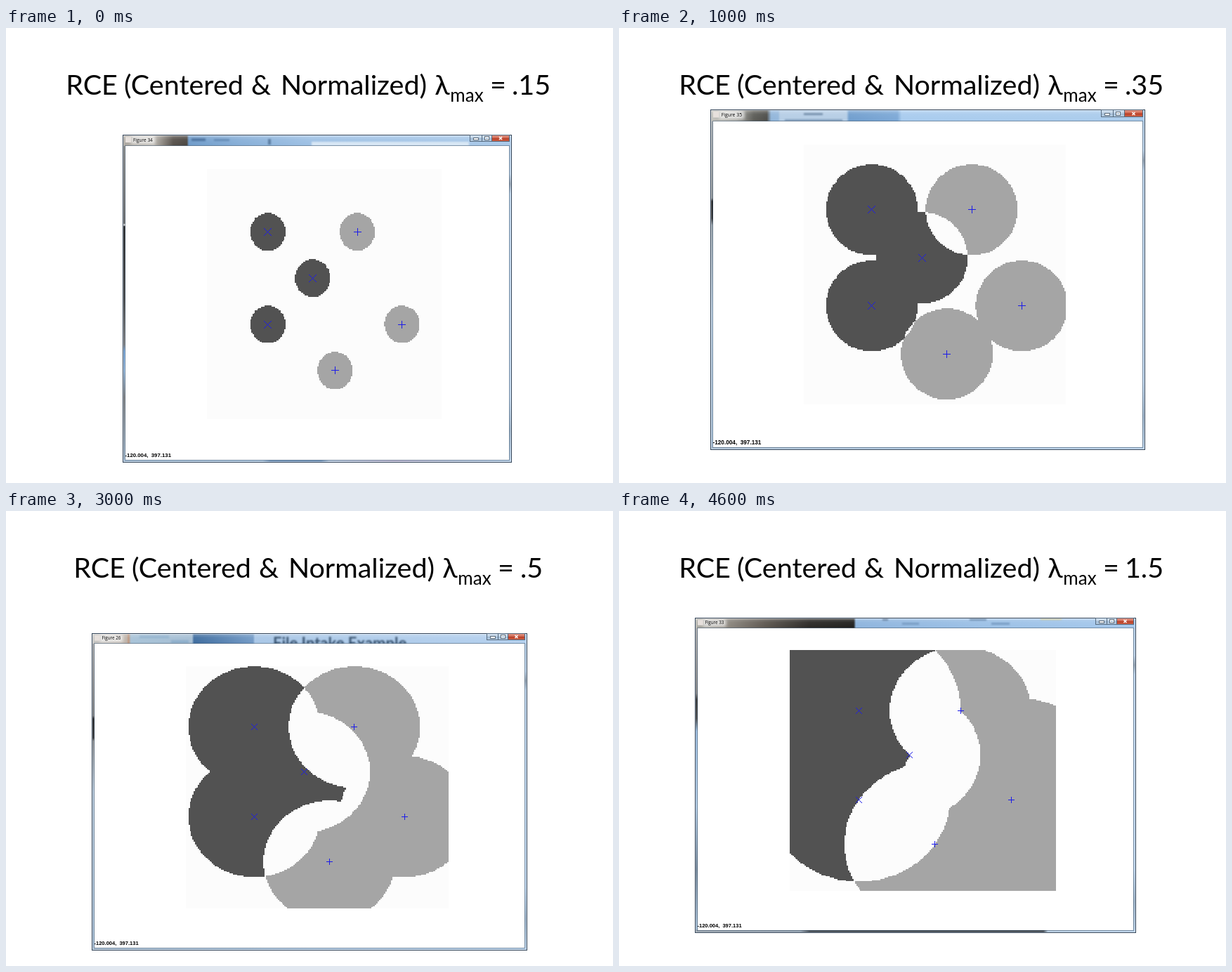
These frames come from a looping animation (864 by 648 pixels, 5 s). An HTML page with a canvas:

```html
<!DOCTYPE html>
<html lang="en">
<head>
<meta charset="utf-8">
<title>RCE decision regions</title>
<style>
html, body { margin: 0; width: 100%; height: 100%; overflow: hidden; background: #fff; }
canvas { display: block; }
</style>
</head>
<body>
<canvas id="stage" width="864" height="648"></canvas>
<script>
const ctx = document.getElementById('stage').getContext('2d');
const STEP = 1000, GRID = 200;
const PAPER = '#fcfcfc', DARK = '#525252', LIGHT = '#a5a5a5', MARK = '#1c1ce8';

// Prototypes sit on a regular lattice, measured in fractions of the plot.
const lattice = ([col, row]) => [.26 + .0953 * col, .251 + .185 * row];
const crosses = [[0, 0], [2, 1], [0, 2]].map(lattice);
const pluses = [[4, 0], [6, 2], [3, 3]].map(lattice);

// win and plot are [left, top, right, bottom]; bar, side and base are colour stops along the frame;
// blurs are soft shapes seen through the title bar: [x, y, w, h, colour].
const scenes = [
  { lambda: .15, label: '.15', figure: 34, win: [166, 152, 720, 619], plot: [286, 201, 620, 557],
    buttons: 57, arm: 5,
    bar: '0 #aaa69f,.08 #b9b5ae,.13 #57514b,.165 #4b4641,.17 #6f9bc9,.3 #86aed7,.48 #9dc0e4,1 #a9c9e9',
    side: '0 #8b8b88,.27 #5e5e5e,.275 #eee,.28 #151515,.5 #333,.64 #777,.66 #6fa3dc,.72 #8fb6de,.8 #777,1 #9bb4cc',
    base: '0 #a3bdd6,.36 #a9c5e0,.38 #6f93bb,.51 #6f93bb,.53 #b5c9df,.7 #b9b3d0,.85 #b3c3dc,1 #b6d0ea',
    blurs: [[264, 157, 20, 4, '#466f9d'], [296, 158, 22, 3, '#5d86b3'], [373, 158, 4, 8, '#56799f'], [435, 162, 224, 6, '#d8e7f5']] },
  { lambda: .35, label: '.35', figure: 35, win: [130, 116, 749, 601], plot: [263, 166, 636, 536],
    buttons: 60, arm: 5,
    bar: '0 #c2c2bc,.06 #a5a5a0,.1 #5b5b56,.13 #4c4c48,.14 #91b5da,.31 #a4c2e0,.32 #6f9dcd,.43 #7ca8d6,.44 #a8cbee,1 #aacbeb',
    side: '0 #aeb4b8,.26 #8a8f92,.27 #111,.32 #222,.34 #95a0a8,.6 #b8cee3,1 #a7c1da',
    base: '0 #a7bdd2,.5 #a9c5e0,1 #b6d0ea',
    blurs: [[228, 118, 97, 15, '#b5cde5'], [263, 121, 27, 3, '#6e8aa8'], [236, 130, 82, 3, '#7f9cba']] },
  { lambda: .4, label: '.4', figure: 32, win: [152, 152, 711, 590], plot: [272, 198, 609, 532],
    buttons: 53, arm: 4,
    bar: '0 #b5b5b2,.07 #999,.1 #282828,.22 #1d1c1b,.26 #50493f,.41 #4a4439,.42 #749fd0,.6 #8eb5df,1 #a4c7eb',
    side: '0 #666,.26 #444,.27 #fff,.28 #9fc4e8,.5 #8faabd,.6 #b4c8da,.8 #555,1 #6f7f8d',
    base: '0 #666,.1 #666,.12 #a4bdd6,.58 #9db8d2,.62 #4a5866,.88 #4a5866,.9 #b6d0ea,1 #b6d0ea',
    blurs: [[393, 156, 27, 3, '#42658c'], [426, 160, 32, 3, '#476c94'], [466, 154, 45, 3, '#577da6'], [550, 157, 12, 3, '#6089b4'], [572, 157, 60, 2, '#7399c2']] },
  { lambda: .5, label: '.5', figure: 26, win: [122, 174, 742, 626], plot: [256, 221, 630, 566],
    buttons: 55, arm: 4, ghost: 'File Intake Example',
    bar: '0 #c6c6c4,.08 #bdb3aa,.085 #bd947b,.09 #a7c2d7,.23 #a4bdd3,.235 #3d6b9e,.37 #7199c5,.375 #a8c6e6,1 #b4d0ee',
    side: '0 #a9a9a9,.26 #777,.27 #111,.33 #222,.34 #888,.5 #b2c6d9,1 #9fb9d2',
    base: '0 #a7bdd2,.5 #b1cbe5,1 #b6d0ea',
    blurs: [[190, 177, 42, 4, '#8eb0cc'], [235, 184, 25, 4, '#8bacc9']] },
  { lambda: 1.5, label: '1.5', figure: 33, win: [108, 152, 736, 601], plot: [243, 198, 622, 541],
    buttons: 55, arm: 4,
    bar: '0 #b0b0a9,.07 #8f8a82,.16 #5b554e,.26 #292724,.36 #1e1e1c,.365 #8db4dd,.65 #9bc0e6,1 #a5c8ec',
    side: '0 #aaa,.24 #777,.26 #1c1c1c,.32 #333,.36 #8fb5dc,.6 #a9c7e4,.8 #667b90,1 #a0bdd8',
    base: '0 #8f9aa5,.24 #8797a6,.26 #2c343c,.79 #2c343c,.8 #b1c9e0,1 #b6d0ea',
    blurs: [[375, 152, 8, 4, '#506f94'], [403, 159, 24, 3, '#7399c1'], [499, 152, 24, 4, '#547ba5'], [530, 159, 26, 3, '#7399c1'], [600, 152, 30, 3, '#c4bd82']] }
];

function text(str, x, y, font, color = '#000', align = 'left') {
  ctx.font = font;
  ctx.fillStyle = color;
  ctx.textAlign = align;
  ctx.fillText(str, x, y);
}

function rect(x, y, w, h, color) {
  ctx.fillStyle = color;
  ctx.fillRect(x, y, w, h);
}

function outline(x, y, w, h, color) {
  ctx.strokeStyle = color;
  ctx.strokeRect(x + .5, y + .5, w - 1, h - 1);
}

function gradient(x0, y0, x1, y1, stops) {
  const g = ctx.createLinearGradient(x0, y0, x1, y1);
  for (const stop of stops.split(',')) {
    const [at, color] = stop.split(' ');
    g.addColorStop(+at, color);
  }
  return g;
}

const dist = (a, b) => Math.hypot(a[0] - b[0], a[1] - b[1]);

// Each radius grows to lambda / 2 unless a prototype of the other class is nearer.
function regions(lambda) {
  const discs = (own, other) => own.map(c => [c, Math.min(lambda / 2, ...other.map(o => dist(c, o)))]);
  const a = discs(crosses, pluses), b = discs(pluses, crosses);
  const map = document.createElement('canvas');
  map.width = map.height = GRID;
  const m = map.getContext('2d');
  for (let j = 0; j < GRID; j++) for (let i = 0; i < GRID; i++) {
    const p = [(i + .5) / GRID, (j + .5) / GRID];
    const hit = ([c, r]) => dist(c, p) <= r;
    const inA = a.some(hit), inB = b.some(hit);
    m.fillStyle = inA === inB ? PAPER : inA ? DARK : LIGHT;
    m.fillRect(i, j, 1, 1);
  }
  return map;
}

function drawTitle(label) {
  const dx = label.length < 3 ? 11 : 0;
  const word = (str, mid, y = 95, size = 39.5) =>
    text(str, mid + dx, y, size + 'px Lato, Carlito, "Open Sans", sans-serif', '#000', 'center');
  word('RCE', 122);
  word('(Centered', 253);
  word('&', 363);
  word('Normalized)', 495);
  word('λ', 621);
  word('max', 656, 105, 26);
  word('=', 700.5);
  word(label, label.length < 3 ? 737 : 747.5);
}

function drawButtons(right, y, w) {
  const h = Math.round(w * .18), x = right - w;
  const a = Math.round(w * .29), b = Math.round(w * .55);
  rect(x, y, b, h, gradient(0, y, 0, y + h, '0 #dce8f4,.5 #b9cee3,.52 #9db8d3,1 #c0d5e9'));
  rect(x + b, y, w - b, h, gradient(0, y, 0, y + h, '0 #e3a293,.48 #cf6650,.52 #b83c25,1 #d1694c'));
  outline(x, y, w, h, '#566b80');
  rect(x + a, y, 1, h, '#566b80');
  rect(x + b, y, 1, h, '#566b80');
  const cy = y + Math.round(h / 2);
  rect(x + 6, cy, 6, 2, '#fff');
  outline(x + 5, cy - 1, 8, 4, '#5d6b79');
  outline(x + a + 4, cy - 3, 7, 6, '#5d6b79');
  outline(x + a + 5, cy - 2, 5, 4, '#fff');
  mark(x + (b + w) / 2, cy, 2, true, '#fff', 1.5);
}

function drawWindow(s) {
  const [l, t, r, b] = s.win, w = r - l, h = b - t;
  const k = s.buttons / 57, top = t + Math.round(16 * k);
  rect(l, t, w, h, gradient(0, t, 0, b, '0 #a9c6e3,.12 #b8d0e8,.15 #8798a9,.18 #b9d2eb,.8 #bbd4ed,.9 #94adc5,1 #b4cee7'));
  rect(l, t, 4, h, gradient(0, t, 0, b, s.side));
  rect(l, b - 5, w, 5, gradient(l, 0, r, 0, s.base));

  ctx.save();
  ctx.beginPath();
  ctx.rect(l, t, w, top - t);
  ctx.clip();
  rect(l, t, w, top - t, gradient(l, 0, r, 0, s.bar));
  ctx.filter = 'blur(1.2px)';
  for (const patch of s.blurs) rect(...patch);
  if (s.ghost) text(s.ghost, 380, 196, 'bold 22px Lato, "Open Sans", sans-serif', '#34506e');
  ctx.filter = 'blur(2px)';
  rect(l + 12 * k, t + 2, 34 * k, 11 * k, '#ffffffb0');
  ctx.filter = 'none';
  rect(l, t, w, top - t, gradient(0, t, 0, top, '0 #ffffff55,.4 #ffffff11,1 #ffffff00'));
  ctx.restore();

  outline(l, t, w, h, '#35465a');
  outline(l + 1, t + 1, w - 2, h - 2, '#ffffff66');
  rect(l + 4, top, w - 8, h - (top - t) - 4, '#fff');
  outline(l + 3, top - 1, w - 6, h - (top - t) - 2, '#52667a99');

  rect(l + 4, t + 3, 8 * k, 8 * k, '#e6e0dc');
  text('Figure ' + s.figure, l + 15 * k, t + 9.5 * k, 6.5 * k + 'px "Open Sans", sans-serif');
  drawButtons(r - 3, t, s.buttons);
  text('-120.004,  397.131', l + 3.5, b - 8, `bold ${7.8 * k}px "Liberation Sans", Arial, sans-serif`);
}

function mark(x, y, arm, diagonal, color, width = 1) {
  const d = diagonal ? arm : 0;
  ctx.strokeStyle = color;
  ctx.lineWidth = width;
  ctx.beginPath();
  ctx.moveTo(x - arm, y - d);
  ctx.lineTo(x + arm, y + d);
  ctx.moveTo(x - d, y + arm);
  ctx.lineTo(x + d, y - arm);
  ctx.stroke();
  ctx.lineWidth = 1;
}

function drawPlot(s) {
  const [l, t, r, b] = s.plot, w = r - l, h = b - t;
  s.map ??= regions(s.lambda);
  ctx.imageSmoothingEnabled = false;
  ctx.drawImage(s.map, l, t, w, h);
  const place = (list, diagonal) => {
    for (const [x, y] of list)
      mark(Math.floor(l + x * w) + .5, Math.floor(t + y * h) + .5, s.arm + .5, diagonal, MARK);
  };
  place(crosses, true);
  place(pluses, false);
}

function draw() {
  const s = scenes[Math.floor(performance.now() / STEP) % scenes.length];
  rect(0, 0, 864, 648, '#fff');
  drawTitle(s.label);
  drawWindow(s);
  drawPlot(s);
  requestAnimationFrame(draw);
}
draw();
</script>
</body>
</html>
```
